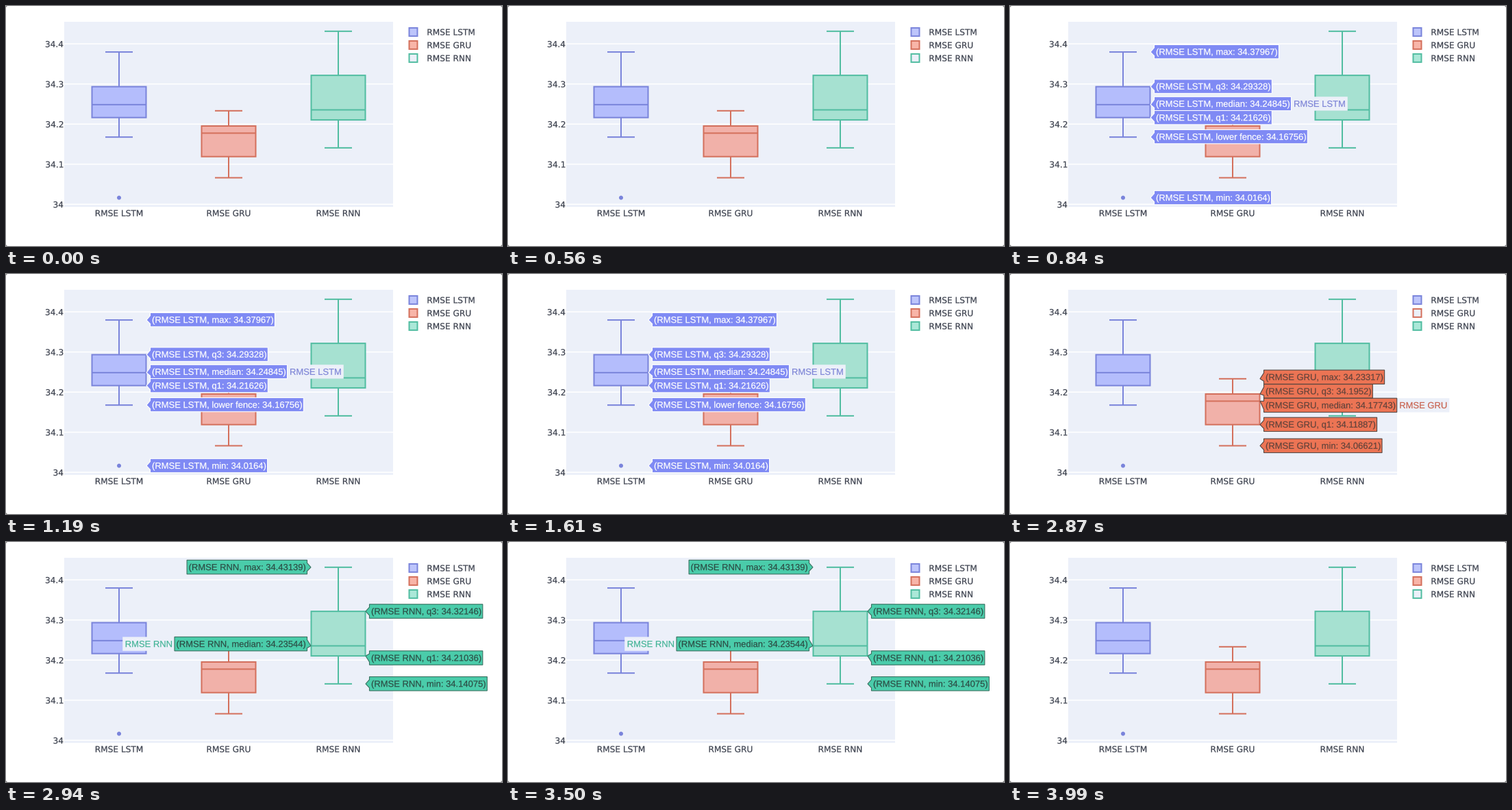
These frames come from a looping animation (724 px wide and 350 px high, 4130 ms). A matplotlib script:

```python
import matplotlib.pyplot as plt
from matplotlib.animation import FuncAnimation
from matplotlib.patches import Circle, PathPatch, Polygon, Rectangle
from matplotlib.textpath import TextPath
from matplotlib.transforms import Affine2D

W, H, DPI = 724, 350, 100
STEP_MS, STEPS = 70, 59
PX = 72 / DPI
STROKE = 2
LIGHT, INK = "#ecf0f9", "#3c414e"
TICK_FONT, HOVER_FONT = "DejaVu Sans", "Liberation Sans"

plt.rcParams["path.snap"] = False
fig = plt.figure(figsize=(W / DPI, H / DPI), dpi=DPI, facecolor="white")
ax = fig.add_axes([0, 0, 1, 1])
ax.set_xlim(0, W)
ax.set_ylim(H, 0)
ax.axis("off")
hover_clip = Rectangle((0, 0), 703, H, transform=ax.transData)

# low whisker, q1, median, q3, high whisker
SERIES = {
    "LSTM": dict(x=165, line="#7a84db", fill="#b4bdfc",
                 stats=(34.16756, 34.21626, 34.24845, 34.29328, 34.37967)),
    "GRU": dict(x=325, line="#d4705c", fill="#f1b1a9",
                stats=(34.06621, 34.11887, 34.17743, 34.1952, 34.23317)),
    "RNN": dict(x=485, line="#51bda1", fill="#a6e1d1",
                stats=(34.14075, 34.21036, 34.23544, 34.32146, 34.43139)),
}
SWATCH = {"LSTM": "#bdc5fb", "GRU": "#f8b5a8", "RNN": "#abe8d8"}

# label fill, border, text colour, name colour
HOVER_STYLE = {
    "LSTM": ("#7f8af4", "white", "white", "#7f86d8"),
    "GRU": ("#ec7454", "#54443f", "#63433b", "#c9634f"),
    "RNN": ("#4accaa", "#38705f", "#2c4d45", "#45b598"),
}

# statistic, value, label centre, side of the box
HOVER = {
    "LSTM": [("max", 34.37967, 66.7, 1), ("q3", 34.29328, 117.2, 1),
             ("median", 34.24845, 142.5, 1), ("q1", 34.21626, 162.7, 1),
             ("lower fence", 34.16756, 190.6, 1), ("min", 34.0164, 279.5, 1)],
    "GRU": [("max", 34.23317, 150.3, 1), ("q3", 34.1952, 170.9, 1),
            ("median", 34.17743, 191.4, 1), ("q1", 34.11887, 219.4, 1),
            ("min", 34.06621, 250.4, 1)],
    "RNN": [("max", 34.43139, 36.6, -1), ("median", 34.23544, 148.6, -1),
            ("q3", 34.32146, 101, 1), ("q1", 34.21036, 169, 1),
            ("min", 34.14075, 206.7, 1)],
}

# hovered box and the span in ms during which its labels show
SCHEDULE = [("LSTM", 700, 1680), ("GRU", 1680, 2940), ("RNN", 2940, 3570)]


def to_y(value):
    return 55.2 + (34.4 - value) * 585


def line(xs, ys, color, width, z):
    ax.plot(xs, ys, color=color, lw=width * PX, zorder=z, solid_capstyle="butt")


def box(x0, y0, x1, y1, fill, edge="none", width=0, z=1):
    return ax.add_patch(Rectangle((x0, y0), x1 - x0, y1 - y0, fc=fill, ec=edge,
                                  lw=width * PX, zorder=z, joinstyle="miter"))


def glyphs(label, size, font):
    return TextPath((0, 0), label, size=size, prop={"family": font})


def put(path, x, y, color, z):
    """Place text outlines with the baseline starting at x, y."""
    place = Affine2D().scale(1, -1).translate(x, y) + ax.transData
    return ax.add_patch(PathPatch(path, fc=color, ec=color, lw=0.2 * PX,
                                  transform=place, zorder=z))


def text(x, y, label, align="left"):
    path = glyphs(label, 12.15, TICK_FONT)
    ink = path.get_extents()
    shift = {"left": 0, "center": (ink.x0 + ink.x1) / 2, "right": ink.x1}[align]
    put(path, x - shift, y, INK, 5)


def draw_chart():
    box(85, 23, 565, 293, LIGHT, z=0)
    for i in range(5):
        y = to_y(34 + i / 10)
        line([85, 565], [y, y], "white", 1.6, 1)
        text(83.3, y + 4.8, f"{34 + i / 10:g}", "right")
    for name, s in SERIES.items():
        x, color = s["x"], s["line"]
        low, q1, median, q3, high = map(to_y, s["stats"])
        for end, edge in ((low, q1), (high, q3)):
            line([x, x], [end, edge], color, STROKE, 2)
            line([x - 20, x + 20], [end, end], color, STROKE, 2)
        box(x - 39.5, q3, x + 39.5, q1, s["fill"], color, STROKE, 3)
        line([x - 39.5, x + 39.5], [median, median], color, STROKE, 4)
        text(x, 306.5, "RMSE " + name, "center")
    ax.add_patch(Circle((165, to_y(34.0164)), 3, fc=SERIES["LSTM"]["line"], lw=0))
    for x, dx in ((0, 2), (W, -2)):
        for y, dy in ((0, 2), (H, -2)):
            ax.add_patch(Polygon([(x, y), (x + dx, y), (x, y + dy)],
                                 fc="#8a8a8a", lw=0))


def draw_legend():
    swatches = {}
    for i, (name, s) in enumerate(SERIES.items()):
        y = 37.9 + 19 * i
        swatches[name] = box(588.5, y - 6, 600.5, y + 6, SWATCH[name], s["line"],
                             STROKE)
        text(614.3, y + 4.6, "RMSE " + name)
    return swatches


def hover_label(name, stat, value, cy, side):
    fill, edge, ink, name_ink = HOVER_STYLE[name]
    tip_x, tip_y = SERIES[name]["x"] + 40 * side, to_y(value)
    near = tip_x + 5.5 * side
    baseline, top, bottom = cy + 4.5, cy - 10.2, cy + 10.2
    path = glyphs(f"(RMSE {name}, {stat}: {value})", 13, HOVER_FONT)
    far = near + (path.get_extents().x1 + 5) * side
    outline = [(tip_x, tip_y), (near, cy - 6), (near, top), (far, top),
               (far, bottom), (near, bottom), (near, cy + 6)]
    shape = ax.add_patch(Polygon(outline, fc=fill, ec=edge, lw=1.1 * PX, zorder=11))
    shape.set_clip_path(hover_clip)
    artists = [shape, put(path, min(near, far) + 2.5, baseline, ink, 12)]
    if stat == "median":
        tag = glyphs("RMSE " + name, 13, HOVER_FONT)
        end = far + (tag.get_extents().x1 + 7.5) * side
        left, right = sorted((far, end))
        artists += [box(left, top, right, bottom, LIGHT, z=9),
                    put(tag, left + 3.5, baseline, name_ink, 10)]
    return artists


draw_chart()
swatches = draw_legend()
hover_groups = {name: [a for row in rows for a in hover_label(name, *row)]
                for name, rows in HOVER.items()}


def update(i):
    now = i * STEP_MS
    active = next((n for n, start, end in SCHEDULE if start <= now < end), None)
    for name, artists in hover_groups.items():
        for artist in artists:
            artist.set_visible(name == active)
    pale = {None: "RNN", "GRU": "GRU"}.get(active)
    for name, swatch in swatches.items():
        swatch.set_facecolor(LIGHT if name == pale else SWATCH[name])
    return []


anim = FuncAnimation(fig, update, frames=STEPS, interval=STEP_MS,
                     init_func=lambda: update(0), repeat=True, repeat_delay=0)
plt.show()
```
